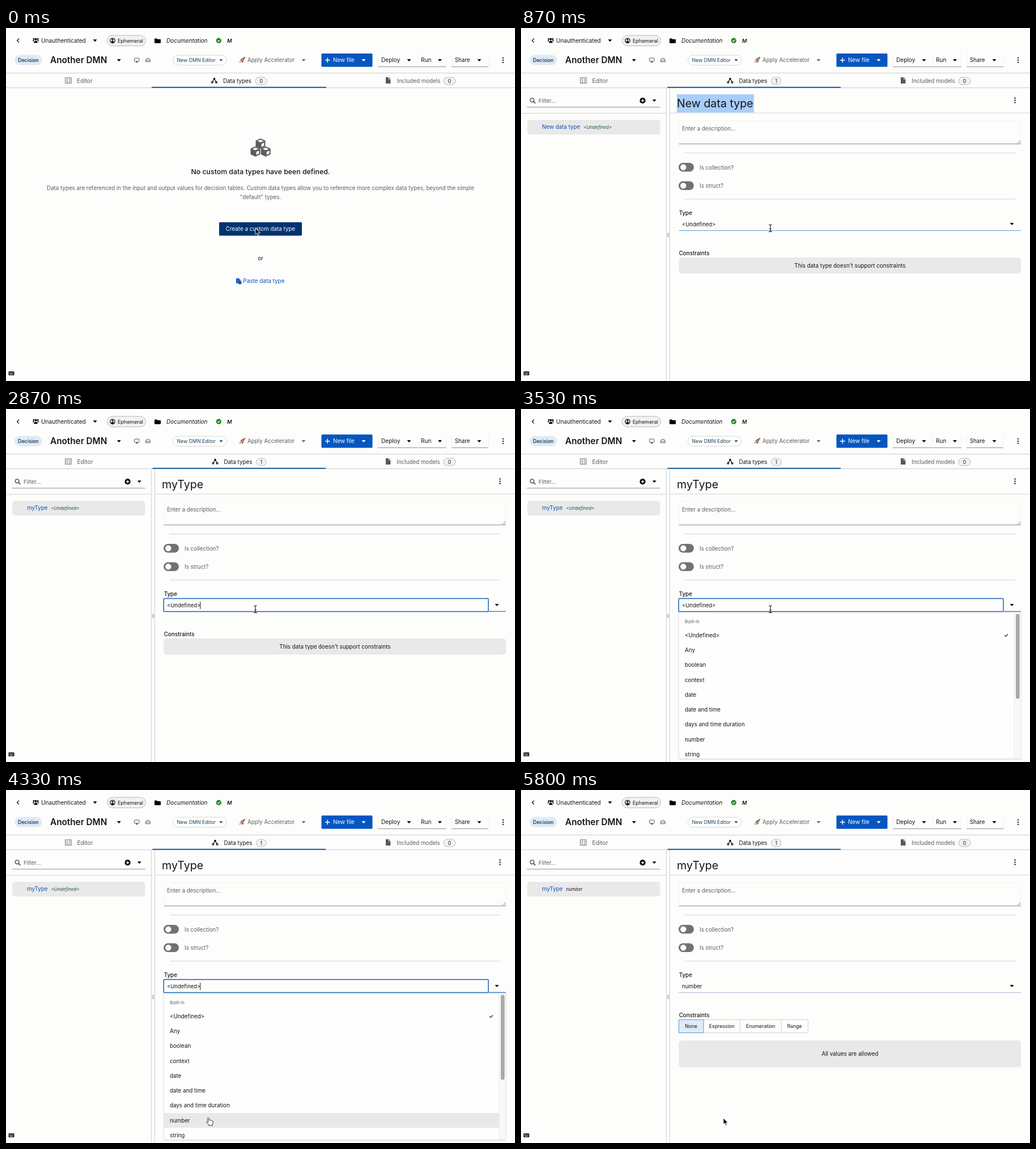
An HTML page for the animation above (5.94 s loop, 898 by 623 pixels).

```html
<!DOCTYPE html>
<html lang="en">
<head>
<meta charset="utf-8">
<title>Custom data type</title>
<style>
html, body { margin: 0; width: 100%; height: 100%; overflow: hidden; background: #fdfdfc; }
svg { display: block; width: 898px; height: 623px; }
text { font: 9.8px Inter, sans-serif; font-optical-sizing: none; fill: #151515; white-space: pre; }
.mid { text-anchor: middle; }
.grey, .grey text { fill: #5a5d61; }
.blue { fill: #0a55b8; }
.small { font-size: 8.7px; }
.med { font-weight: 500; }
.it { font-style: italic; }
.line { fill: none; stroke: #d2d2d2; }
.dark { stroke: #8a8d90; }
.hr { stroke: #cfcfe6; }
.box { fill: #e9e9e9; }
.pill { fill: #f2f2f2; stroke: #b9b9b9; }
.ink { fill: none; stroke: #151515; stroke-width: 1.3; }
.title { font-size: 19.6px; }
</style>
</head>
<body>
<svg viewBox="0 0 898 623">
  <defs>
    <path id="caret" d="M-3.5-2h7L0 2z"/>
    <g id="kebab"><circle cy="-4" r="1.3"/><circle r="1.3"/><circle cy="4" r="1.3"/></g>
    <g id="toggle">
      <rect width="27" height="15.6" rx="7.8" fill="#707275"/>
      <circle cx="8.3" cy="7.8" r="5.2" fill="#fff"/>
    </g>
    <g id="cube">
      <path d="M0-9 8.5-5.3V5L0 9-8.5 5V-5.3z" fill="#595c60"/>
      <path d="M0-6.7 5.5-4.5 0-2.2-5.5-4.5zM1.6.4 6.3-1.7V3.7L1.6 6z" fill="#fdfdfc"/>
    </g>
    <g id="doc"><path d="M0 0H5V3.4H8.4V11H0zM5.8 0 8.4 2.6H5.8z"/></g>
  </defs>

  <!-- header -->
  <path class="ink" d="M23 18.8 19.6 22.2 23 25.6"/>
  <g>
    <circle cx="52.5" cy="19.8" r="2"/><circle cx="48.9" cy="19.4" r="1.4"/><circle cx="56.1" cy="19.4" r="1.4"/>
    <path d="M49.2 26.3c0-5 6.6-5 6.6 0zM47 23.6c0-3 2.6-3.1 3-2.2l-1.4 2.2zM58 23.6c0-3-2.6-3.1-3-2.2l1.4 2.2z"/>
  </g>
  <text x="62" y="25.8" font-size="10" style="font-size:10.1px">Unauthenticated</text>
  <use href="#caret" x="157" y="22.3"/>
  <rect class="pill" x="178.5" y="13" width="68" height="18.5" rx="9.2"/>
  <circle class="ink" cx="188" cy="22.3" r="4.2" stroke-width="1"/>
  <circle cx="188" cy="20.8" r="1.5"/><path d="M185.3 25c.5-3 4.9-3 5.4 0-1.5 1.4-3.9 1.4-5.4 0z"/>
  <text x="197" y="25.5" style="font-size:8.95px">Ephemeral</text>
  <path d="M262 19.4q0-1 1-1h3l1.3 1.4h4.7q1 0 1 1v5q0 1-1 1h-9q-1 0-1-1z"/>
  <text class="it" x="283" y="25.8" style="font-size:10.05px">Documentation</text>
  <circle cx="375.3" cy="22.2" r="4.6" fill="#1f851f"/>
  <path d="M373.1 22.2 374.8 23.8 377.6 20.7" fill="none" stroke="#fff" stroke-width="1.2"/>
  <text class="it" x="390" y="25.6" style="font-size:9.2px;font-weight:600">M</text>

  <rect x="15" y="47.5" width="48.5" height="18" rx="9" fill="#deebf6"/>
  <text class="med" x="21" y="60" style="font-size:8.9px;fill:#0f2740">Decision</text>
  <text x="78" y="62.4" style="font-size:15.3px;font-weight:600">Another DMN</text>
  <use href="#caret" x="199.3" y="57"/>
  <rect class="line" x="226.5" y="53" width="8.5" height="5.8" rx="1" style="stroke:#5a5d61"/>
  <path d="M229.6 58.8h2.4l.7 2.2h-3.8z" fill="#5a5d61"/>
  <path class="line" d="M246.3 57 248 53.6h4.6l1.7 3.4v2.6h-8zh8" style="stroke:#5a5d61"/>
  <rect x="294.5" y="48" width="94.5" height="17.5" rx="8.7" fill="#fff" stroke="#d6d6d6"/>
  <text x="301.5" y="60" style="font-size:8.75px;fill:#1b4157">New DMN Editor</text>
  <use href="#caret" transform="translate(379.5 57) scale(.85)" fill="#1b4157"/>
  <g>
    <path d="M411.2 61.8 412.6 57.5 415.3 60.2z" fill="#f2a33a"/>
    <path d="M413.2 56.5 416 53.5h2.4l-3.2 4zM416 59.6 419.2 56.6v2.4l-3 2.8z" fill="#c8382f"/>
    <path d="M414 58.6C415 54.4 418 51.4 422 51c-.3 4-3.2 7.2-7 8.6z" fill="#8d979f"/>
    <circle cx="418.7" cy="54.3" r="1.1" fill="#2f5f8c"/>
    <path d="M419.8 51.3q1.2-.3 2.2-.3 0 1.2-.3 2.2z" fill="#c8382f"/>
  </g>
  <text class="grey" x="426" y="60.2">Apply Accelerator</text>
  <use href="#caret" x="525" y="57" fill="#6a6e73"/>
  <rect x="556.5" y="45" width="90" height="23.5" rx="1.5" fill="#0556c0"/>
  <path d="M563 56.7h8.6M567.3 52.4v8.6" stroke="#fff" stroke-width="1.5"/>
  <text x="577" y="60.2" style="fill:#fff">New file</text>
  <use href="#caret" x="631" y="57" fill="#fff"/>
  <path class="line" d="M656.5 45V68M726.5 45V68M776 45V68M786.5 45V68M851 45V68" style="stroke:#f0f0f0"/>
  <path class="line dark" d="M656 68.3H726.5M727.5 68.3H776.5M786 68.3H851"/>
  <text x="662" y="60.2" style="font-size:10.1px">Deploy</text><use href="#caret" x="711" y="57"/>
  <text x="732" y="60.2" style="font-size:10.1px">Run</text><use href="#caret" x="765.5" y="57"/>
  <text x="791.7" y="60.2">Share</text><use href="#caret" x="835" y="57"/>
  <use href="#kebab" x="877" y="56.7" fill="#333"/>

  <!-- tabs -->
  <path class="line" d="M0 79.5H898M0 105.5H898" style="stroke:#cdcdcd"/>
  <g class="line" style="stroke:#6a6e73">
    <rect x="104.7" y="87.8" width="10.4" height="9.6"/>
    <path d="M106.5 90.3h3M111 90.3h2.6M106.5 92.8h3M111 92.8h2.6M106.5 95.2h3M111 95.2h2.6"/>
  </g>
  <rect class="pill" x="772" y="87" width="21" height="13" rx="6.5"/>
  <text class="mid small" x="782.5" y="96.7">0</text>
  <use href="#doc" x="670" y="87" fill="#55585c"/>
  <g id="treeIcon"></g>
  <g data-t="0 870">
    <path d="M257 104.8H565" stroke="#11609c" stroke-width="2"/>
    <text class="grey" x="124.8" y="96.6" style="font-size:10.2px">Editor</text>
    <use href="#tree" x="367.5" y="92.7"/>
    <text x="383" y="96.6">Data types</text>
    <rect class="pill" x="440" y="87" width="20.5" height="13" rx="6.5"/>
    <text class="mid small" x="450.2" y="96.7">0</text>
    <text class="grey" x="690" y="96.6">Included models</text>
  </g>
  <g data-t="870 5940">
    <path d="M258.5 104.8H564" stroke="#11609c" stroke-width="2"/>
    <text class="grey" x="125.5" y="96.6" style="font-size:10.2px">Editor</text>
    <use href="#tree" x="369" y="92.7"/>
    <text x="384.5" y="96.6">Data types</text>
    <rect class="pill" x="441.5" y="87" width="17.5" height="13" rx="6.5"/>
    <text class="mid small" x="450.2" y="96.7">1</text>
    <text class="grey" x="689.3" y="96.6">Included models</text>
  </g>
  <defs>
    <g id="tree">
      <path class="ink" d="M0-3 -3.5 2.8M0-3 3.5 2.8" stroke-width="1"/>
      <circle cy="-3.2" r="1.7"/>
      <circle cx="-3.6" cy="3" r="1.4" class="ink"/><circle cx="3.6" cy="3" r="1.4" class="ink"/>
    </g>
  </defs>

  <!-- empty state -->
  <g data-t="0 870">
    <use href="#cube" x="449" y="204"/><use href="#cube" x="440" y="218"/><use href="#cube" x="458.2" y="218"/>
    <text class="mid med" x="449" y="258.4" style="font-size:12.3px">No custom data types have been defined.</text>
    <g class="grey mid">
      <text x="449" y="286" style="font-size:9.75px">Data types are referenced in the input and output values for decision tables. Custom data types allow you to reference more complex data types, beyond the simple</text>
      <text x="449" y="301.6">"default" types.</text>
    </g>
    <rect x="376" y="342.7" width="146" height="23.8" rx="1.5" fill="#003370"/>
    <text class="mid" x="449" y="358.3" style="fill:#fff">Create a custom data type</text>
    <text class="mid" x="449" y="409.5">or</text>
    <g fill="#0a55b8"><path d="M406 442h6v2h-2.4v6.6H406z"/><use href="#doc" transform="translate(409.8 444.2) scale(.66 .72)"/></g>
    <text class="blue" x="418.3" y="450" style="font-size:9.95px">Paste data type</text>
  </g>

  <!-- type editor -->
  <g data-t="870 5940">
    <path class="line" d="M256.5 106V623M262.5 106V623M0 150.5H256M263 150H898"/>
    <path class="line dark" d="M258.6 361.5V369M260.6 361.5V369" stroke-width=".8"/>
    <circle class="ink" cx="19.6" cy="127.2" r="3.3" style="stroke:#444"/>
    <path class="ink" d="M22 129.6 25.4 133" style="stroke:#444;stroke-width:1.7"/>
    <text class="grey" x="31" y="131.8" style="font-size:9.6px">Filter...</text>
    <circle cx="214.6" cy="128.2" r="5.1"/>
    <path d="M211.8 128.2h5.6M214.6 125.4v5.6" stroke="#fff" stroke-width="1.4"/>
    <use href="#caret" x="235.3" y="128.3"/>
    <path class="line dark" d="M10.5 139.7H245.5"/>
    <rect class="box" x="11" y="162" width="234.5" height="26" rx="5"/>
    <text x="37" y="178.3"><tspan id="name" class="blue"></tspan><tspan id="kind" class="it" dx="6" font-size="8"></tspan></text>

    <rect data-t="870 1470" x="275" y="117" width="136" height="32" fill="#a9cdfa"/>
    <text id="title" class="title" x="275" y="140"></text>
    <path id="titleCaret" d="M0 119V146.5" stroke="#151515" stroke-width="1.2"/>
    <use href="#kebab" x="871.5" y="127.6" fill="#333"/>

    <path class="line" d="M278.5 204V163.5H881.5V204" style="stroke:#f3f3f3"/>
    <text class="grey" x="284" y="180.9" style="font-size:9.7px">Enter a description...</text>
    <path class="line dark" d="M278.5 204.6H882M875.8 203.6 881.4 198M878.8 203.6 881.4 201"/>
    <path class="line hr" d="M289 220.5H872M289 302H872"/>
    <use href="#toggle" x="278" y="238"/><text class="grey" x="315" y="249.5">Is collection?</text>
    <use href="#toggle" x="278" y="270.4"/><text class="grey" x="315" y="282">Is struct?</text>

    <text class="med" x="278.7" y="330">Type</text>
    <text id="value" x="284" y="349.8"></text>
    <path data-t="870 2870" d="M278.5 357.5H882" stroke="#5a9fd6"/>
    <path data-t="4530 5940" d="M278.5 357.5H882" stroke="#b5b5d3"/>
    <g data-t="2870 4530">
      <rect x="278.2" y="334.5" width="572.8" height="23" rx="1" fill="none" stroke="#1561bb" stroke-width="1.5"/>
      <path d="M852 357.3H882" stroke="#3475c2" stroke-width="1.3"/>
      <path id="fieldCaret" d="M342.7 340V353" stroke="#151515"/>
    </g>
    <use href="#caret" x="866" y="346"/>

    <text class="med" x="278.7" y="400.6">Constraints</text>
    <g data-t="870 4530">
      <rect class="box" x="278.3" y="405" width="603.7" height="28.5" rx="5"/>
      <text class="mid" x="580.4" y="423.4">This data type doesn't support constraints</text>
    </g>
    <g data-t="4530 5940">
      <path class="line" d="M322 405.3H506.5V428.5H322M386.5 405V428.5M459.5 405V428.5"/>
      <rect x="278.5" y="405.3" width="43.5" height="23.2" fill="#dfebf6" stroke="#5c9cd6"/>
      <g class="mid">
        <text class="small" x="300.2" y="420">None</text>
        <text class="small" x="354.3" y="420">Expression</text>
        <text class="small" x="422.8" y="420">Enumeration</text>
        <text class="small" x="482.7" y="420">Range</text>
        <rect class="box" x="278.3" y="442" width="603.7" height="47.5" rx="5"/>
        <text x="580.4" y="469.3">All values are allowed</text>
      </g>
    </g>
  </g>

  <!-- dropdown -->
  <g data-t="3270 4530">
    <rect x="278" y="360.5" width="604.5" height="259" rx="2" fill="#000" opacity=".06"/>
    <rect x="278" y="359" width="604" height="258.5" fill="#fefefe" stroke="#dcdcdc"/>
    <rect id="hover" class="box" x="278.5" width="591.5" height="26.2"/>
    <rect x="870" y="359.5" width="11.5" height="257.5" fill="#f8f8f8"/>
    <path class="line" d="M870 359.5V617" style="stroke:#e8e8e8"/>
    <rect x="873" y="361.5" width="6.6" height="150" rx="3.3" fill="#a9a9a9"/>
    <text class="grey" x="289" y="377.6" style="font-size:7.7px">Built-in</text>
    <g id="rows"></g>
    <path d="M853 399.3 855.2 401.4 859 397.2" fill="none" stroke="#0a55b8" stroke-width="1.5"/>
  </g>

  <!-- keyboard badge -->
  <rect x="4.5" y="606" width="10" height="7" rx="1" fill="#222"/>
  <path d="M6 608.2h7M6 609.8h7" stroke="#fff" stroke-width=".8" stroke-dasharray="1 .8"/>
  <path d="M7.3 611.5h4.4" stroke="#fff" stroke-width=".8"/>

  <!-- pointer -->
  <g id="pointer">
    <path id="arrow" d="M0 0V11.2L2.6 8.8 4.5 13 6.4 12.2 4.6 8.1H8.2z" fill="#000" stroke="#fff" stroke-width=".9"/>
    <path id="beam" d="M-2.8-6Q0-6 0-4.4 0-6 2.8-6M0-5V6M-2.8 6.6Q0 6.6 0 5 0 6.6 2.8 6.6M-1.6 1.5H1.6" fill="none" stroke="#151515" stroke-width="1.1"/>
    <path id="hand" d="M-1.4.6C-1.4-.8.7-.8.9.5L1.5 4C2 3 3.7 3.2 3.9 4.2 4.6 3.4 6 3.8 6.2 4.8 7 4.3 8.2 4.8 8.2 6V9L7 11.3V13H.7V11.8L-3.3 7.4C-3.6 6-2.2 5.7-1.4 6.5L-.2 7.7z" fill="#fff" stroke="#151515" stroke-width=".9"/>
  </g>
</svg>
<script>
const LOOP = 5940, OPEN = 870, FOCUS = 2870, MENU = 3270, PICK = 4530;
const ROW_TOP = 386.2, ROW = 26.25;
const $ = id => document.getElementById(id);
const show = (el, on) => { el.style.display = on ? '' : 'none'; };

const types = ['<Undefined>', 'Any', 'boolean', 'context', 'date', 'date and time',
  'days and time duration', 'number', 'string'];
types.forEach((type, i) => {
  const row = document.createElementNS('http://www.w3.org/2000/svg', 'text');
  row.setAttribute('x', 289);
  row.setAttribute('y', ROW_TOP + ROW * i + 16.7);
  row.textContent = type;
  $('rows').append(row);
});

const timed = [...document.querySelectorAll('[data-t]')].map(el => {
  const [from, to] = el.dataset.t.split(' ').map(Number);
  return { el, from, to };
});

// time of each keystroke
const keys = [1470, 1570, 1800, 1930, 2070, 2200];
// time, x, y
const path = [[3600, 440, 353], [3800, 411, 412], [4000, 374.5, 499.5],
  [4130, 363, 554], [4270, 357, 579]];

function pointerAt(t) {
  if (t <= path[0][0]) return path[0].slice(1);
  const i = path.findIndex(p => p[0] > t);
  if (i < 0) return path[path.length - 1].slice(1);
  const [t0, x0, y0] = path[i - 1], [t1, x1, y1] = path[i];
  const k = (t - t0) / (t1 - t0);
  return [x0 + (x1 - x0) * k, y0 + (y1 - y0) * k];
}

function draw(t) {
  for (const { el, from, to } of timed) show(el, t >= from && t < to);

  const typed = keys.filter(k => t >= k).length;
  $('title').textContent = typed ? 'myType'.slice(0, typed) : 'New data type';
  show($('titleCaret'), typed && t < FOCUS);
  if (typed && t < FOCUS) {
    const end = 275.6 + $('title').getComputedTextLength();
    $('titleCaret').setAttribute('transform', `translate(${end} 0)`);
  }

  const type = t < PICK ? types[0] : 'number';
  $('name').textContent = t < FOCUS ? 'New data type' : 'myType';
  $('kind').textContent = type;
  $('kind').style.fill = t < PICK ? '#22504a' : '#151515';
  $('value').textContent = type;
  $('value').style.fontSize = t < PICK ? '9.5px' : '9.8px';
  show($('fieldCaret'), (t - FOCUS) % 1000 < 500);

  const [x, y] = pointerAt(t);
  // the highlight trails the pointer slightly
  const row = Math.floor((pointerAt(t - 70)[1] - ROW_TOP) / ROW);
  show($('hover'), row >= 0);
  $('hover').setAttribute('y', ROW_TOP + ROW * row);

  const arrow = t < OPEN || t >= PICK;
  const beam = !arrow && y < 359;
  $('pointer').setAttribute('transform', `translate(${x} ${y})`);
  show($('pointer'), t < keys[0] || t >= 2670);
  show($('arrow'), arrow);
  show($('beam'), beam);
  show($('hand'), !arrow && !beam);
}

const start = performance.now();
function tick() {
  draw((performance.now() - start) % LOOP);
  requestAnimationFrame(tick);
}
tick();
</script>
</body>
</html>
```
